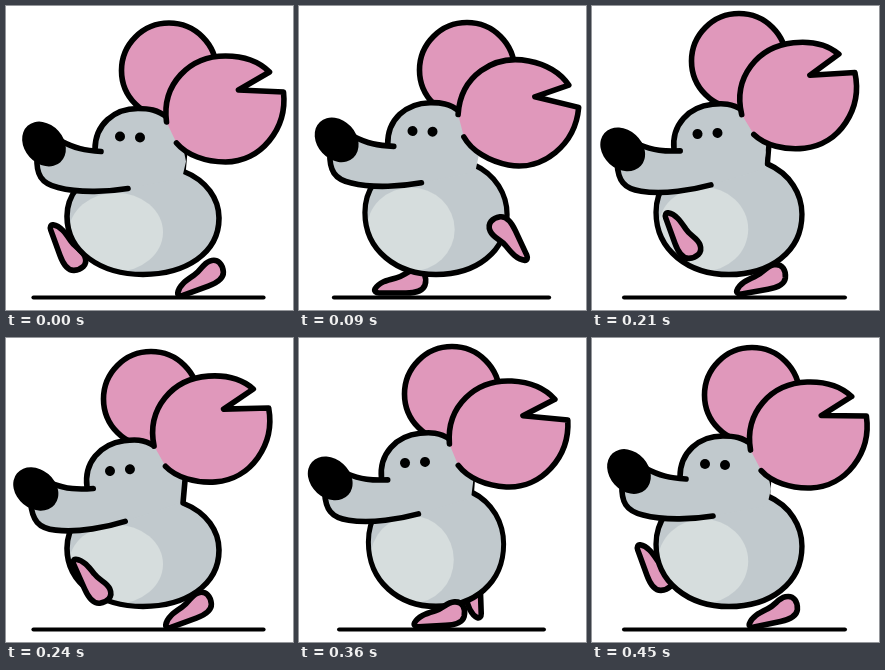
These frames come from a looping animation (287x304 px, 480 ms). An HTML page without scripts:

```html
<!DOCTYPE html>
<html lang="en">
<head>
<meta charset="utf-8">
<title>Walking mouse</title>
<style>
  html, body { margin: 0; width: 100%; height: 100%; overflow: hidden; background: #fff; }
  svg { display: block; width: 287px; height: 304px; }

  .ink { fill: none; stroke: #000; stroke-width: 5.6; stroke-linecap: round; stroke-linejoin: round; }
  .ink * { vector-effect: non-scaling-stroke; }
  .pink { fill: #e098bb; }
  .grey { fill: #c1c9cd; }
  .light { fill: #d6dddd; }
  .ground { stroke-width: 4.2; }

  /* One cycle is 16 ticks of 30 ms; every segment advances in whole ticks. */
  .move { animation: 480ms steps(2) infinite; }
  .squash { animation-name: squash; animation-duration: 240ms; }
  .head { animation-name: head; }
  .back-ear { animation-name: back-ear; }
  .front-ear { animation-name: front-ear; }
  .front-foot { animation-name: front-foot; }
  .back-foot { animation-name: back-foot; }

  @keyframes squash {
    0%, 100% { scale: 1 .94; }
    25% { scale: .98 .985; animation-timing-function: steps(1); }
    37.5% { scale: .935 1; animation-timing-function: steps(1); }
    50% { scale: .89 1.04; animation-timing-function: steps(1); }
    62.5% { scale: .89 1.04; }
    87.5% { scale: .96 1.005; animation-timing-function: steps(1); }
  }
  @keyframes head {
    0%, 100% { translate: 114px 130.5px; rotate: 0deg; animation-timing-function: steps(1); }
    6.25% { translate: 115px 132px; rotate: 1deg; }
    18.75% { translate: 113.5px 125px; rotate: -1deg; }
    31.25% { translate: 109.5px 123px; rotate: -2deg; }
    43.75% { translate: 105.5px 128px; rotate: -6deg; animation-timing-function: steps(1); }
    50% { translate: 104px 133px; rotate: -8deg; }
    62.5% { translate: 104px 135px; rotate: -10deg; }
    75% { translate: 106px 125px; rotate: -6deg; animation-timing-function: steps(1); }
    81.25% { translate: 108px 123px; rotate: -4deg; }
    93.75% { translate: 113px 126px; rotate: 0deg; animation-timing-function: steps(1); }
  }
  @keyframes back-ear {
    0%, 100% { translate: 163px 64.5px; }
    12.5% { translate: 168px 67px; animation-timing-function: steps(1); }
    18.75% { translate: 168px 64px; }
    31.25% { translate: 156px 53.5px; }
    43.75% { translate: 147px 55px; animation-timing-function: steps(1); }
    50% { translate: 145px 61px; }
    62.5% { translate: 149px 65px; }
    75% { translate: 153px 56px; animation-timing-function: steps(1); }
    81.25% { translate: 155px 53px; }
    93.75% { translate: 160px 57px; animation-timing-function: steps(1); }
  }
  @keyframes front-ear {
    0%, 100% { translate: 219.5px 103px; rotate: 0deg; }
    12.5% { translate: 221px 108px; rotate: 8deg; animation-timing-function: steps(1); }
    18.75% { translate: 219.5px 107px; rotate: 11deg; }
    31.25% { translate: 214px 94px; rotate: 0deg; }
    43.75% { translate: 207px 89.5px; rotate: -6deg; animation-timing-function: steps(1); }
    50% { translate: 206px 91px; rotate: -4deg; }
    62.5% { translate: 206px 97px; rotate: 0deg; }
    75% { translate: 210px 96px; rotate: 3deg; animation-timing-function: steps(1); }
    81.25% { translate: 212px 95px; rotate: 2deg; }
    93.75% { translate: 217px 97px; rotate: -2deg; animation-timing-function: steps(1); }
  }
  @keyframes front-foot {
    0%, 100% { translate: 206px 267px; rotate: -20deg; }
    12.5% { translate: 205px 227px; rotate: -100deg; animation-timing-function: steps(1); }
    18.75% { translate: 203px 222px; rotate: -115deg; animation-timing-function: steps(1); }
    25% { translate: 187px 240px; rotate: -98deg; animation-timing-function: steps(1); }
    31.25% { translate: 152px 250px; rotate: -88deg; }
    43.75% { translate: 96px 241px; rotate: 70deg; animation-timing-function: steps(1); }
    50% { translate: 92px 254px; rotate: 66deg; }
    62.5% { translate: 120px 276px; rotate: 0deg; }
    75% { translate: 154px 276px; rotate: -3deg; animation-timing-function: steps(3); }
    93.75% { translate: 194px 271px; rotate: -12deg; animation-timing-function: steps(1); }
  }
  @keyframes back-foot {
    0%, 100% { translate: 67px 253px; rotate: 70deg; }
    12.5% { translate: 103px 276px; rotate: 0deg; animation-timing-function: steps(1); }
    18.75% { translate: 115px 276px; rotate: 0deg; }
    31.25% { translate: 150px 276px; rotate: -3deg; }
    43.75% { translate: 182px 271px; rotate: -10deg; animation-timing-function: steps(1); }
    50% { translate: 194px 267px; rotate: -20deg; }
    62.5% { translate: 186px 222px; rotate: -115deg; }
    75% { translate: 170px 241px; rotate: -92deg; animation-timing-function: steps(1); }
    81.25% { translate: 137px 250px; rotate: -82deg; }
    93.75% { translate: 68px 241px; rotate: 70deg; animation-timing-function: steps(1); }
  }
</style>
</head>
<body>
<svg viewBox="0 0 287 304" role="img" aria-label="A walking mouse">
  <defs>
    <path id="foot" d="M-39 7C-35 0-26-2-18-4C-9-6-6-12 2-12C11-12 13-4 11 3C9 9 2 11-8 11H-35C-38 11-40 9-39 7Z"/>
    <path id="torso" d="M42-134L40-110C64-100 76-80 76-60C76-22 42 0 0 0C-42 0-76-24-76-62C-76-74-72-84-66-92"/>
    <clipPath id="inside"><use href="#torso"/></clipPath>
  </defs>

  <g class="ink ground" transform="translate(142.5 291.5)">
    <path class="move squash" d="M-115 0H115"/>
  </g>

  <g class="ink move back-foot"><use href="#foot" class="pink"/></g>
  <g class="ink move back-ear"><circle class="pink" r="47.5"/></g>

  <g class="ink" transform="translate(137 268.5)">
    <g class="move squash">
      <g stroke="none">
        <use href="#torso" class="grey"/>
        <path class="grey" d="M42-134L28-146L0-100Z"/>
        <g clip-path="url(#inside)">
          <ellipse class="light" cx="-27" cy="-45" rx="47" ry="42"/>
        </g>
      </g>
      <use href="#torso"/>
    </g>
  </g>

  <!-- Head, drawn around the left eye -->
  <g class="ink move head">
    <path class="grey" stroke="none" d="M47-19C38-27 28-28 18-28C-6-28-25-12-25 13L-55 6L-83 20C-84 38-79 47-62 51C-40 57-10 55 8 52L62 42L66 25L60-4Z"/>
    <path d="M47-19C38-27 28-28 18-28C-6-28-25-12-25 13"/>
    <path d="M-60 4C-45 12-35 14-19 15"/>
    <path d="M-83 20C-84 38-79 47-62 51C-40 57-10 55 8 52"/>
    <g fill="#000" stroke="none">
      <ellipse rx="24.5" ry="19.5" transform="translate(-76 7.5) rotate(48)"/>
      <circle r="5"/>
      <circle cx="20" cy="1" r="5"/>
    </g>
  </g>

  <g class="ink move front-ear">
    <path class="pink" d="M-59 13C-64-25-36-53 0-53C17-53 33-48 44-37L13-19L58-17C62 20 35 53 0 53C-20 53-39 46-49 34"/>
  </g>

  <g class="ink move front-foot"><use href="#foot" class="pink"/></g>
</svg>
</body>
</html>
```
